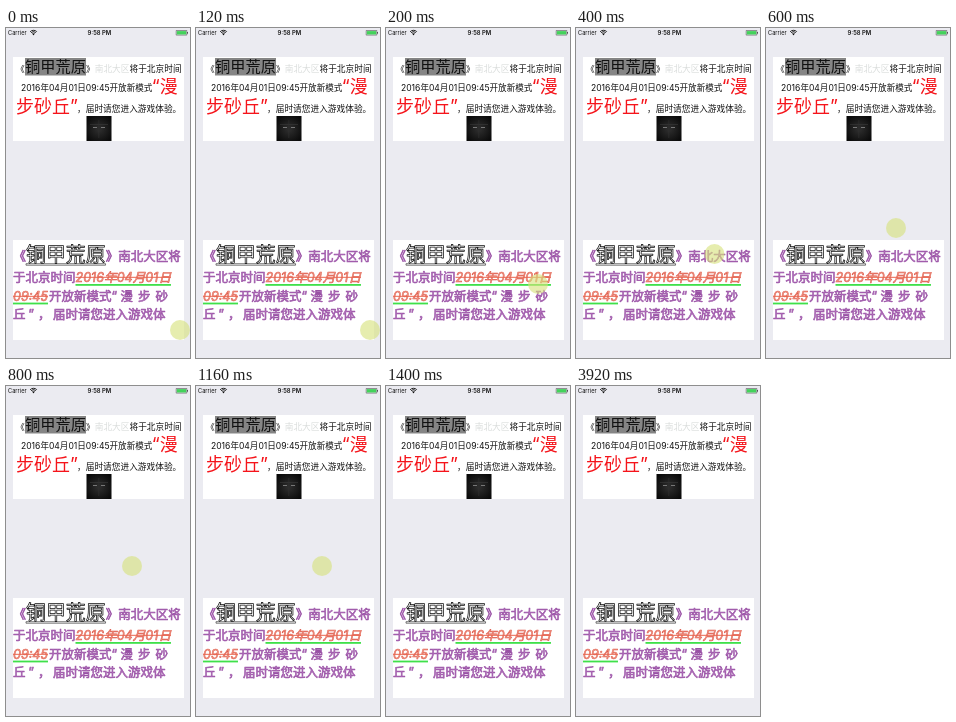
Recreate the animation shown at these times as an HTML page with a canvas. Size 184 by 330 pixels, loop 5600 ms.

```html
<!DOCTYPE html>
<html lang="zh">
<head>
<meta charset="utf-8">
<style>
html, body { margin: 0; width: 100%; height: 100%; overflow: hidden; background: #ebebf1; }
canvas { display: block; width: 184px; height: 330px; }
</style>
</head>
<body>
<canvas id="stage"></canvas>
<script>
const W = 184, H = 330, LOOP = 5600;
const FONT = 'Inter, "Noto Sans CJK SC", "Noto Sans CJK", sans-serif';
const GAME = '铜甲荒原';
const PURPLE = { fill: '#b877c0', stroke: '#9850a4', line: 0.6 };
const DATE = { fill: '#f2a18d', stroke: '#df5a4c', line: 0.55 };
const HOLLOW = { fill: '#fff', stroke: '#111', line: 0.75 };

// Touch dot: start time and centre; null hides it.
const TOUCH = [
  [0, 174, 302],
  [200, 152, 256],
  [400, 138.5, 226],
  [600, 130, 200],
  [800, 126, 180],
  [1400, null]
];

const canvas = document.getElementById('stage');
const ctx = canvas.getContext('2d');
const scale = Math.max(1, window.devicePixelRatio || 1);
canvas.width = W * scale;
canvas.height = H * scale;
ctx.scale(scale, scale);

function rect(x, y, w, h, color) {
  ctx.fillStyle = color;
  ctx.fillRect(x, y, w, h);
}

// Draws one run of text and returns where it ends.
function run(str, x, y, size, style, variant = '') {
  ctx.font = `${variant} ${size}px ${FONT}`;
  ctx.fillStyle = style.fill || style;
  ctx.fillText(str, x, y);
  if (style.stroke) {
    ctx.strokeStyle = style.stroke;
    ctx.lineWidth = style.line;
    ctx.lineJoin = 'round';
    ctx.strokeText(str, x, y);
  }
  return x + ctx.measureText(str).width;
}

function statusBar() {
  run('Carrier', 2, 7, 5.7, '#111');
  run('9:58 PM', 81.5, 7, 5.9, '#111', '600');

  ctx.strokeStyle = '#111';
  ctx.lineWidth = 0.9;
  for (const r of [1.7, 3.3, 4.7]) {
    ctx.beginPath();
    ctx.arc(27.5, 7, r, -Math.PI * 0.76, -Math.PI * 0.24);
    ctx.stroke();
  }
  ctx.fillStyle = '#111';
  ctx.beginPath();
  ctx.arc(27.5, 6.5, 0.7, 0, Math.PI * 2);
  ctx.fill();

  ctx.strokeStyle = '#333';
  ctx.lineWidth = 0.5;
  ctx.strokeRect(170.2, 2.5, 10.6, 4.6);
  rect(170.8, 3.1, 9.4, 3.4, '#43d25b');
  rect(181.2, 4, 0.8, 1.7, '#333');
}

function picture() {
  const glow = ctx.createRadialGradient(93, 101, 2, 93, 101, 16);
  glow.addColorStop(0, '#2b2b2b');
  glow.addColorStop(1, '#080808');
  rect(80.5, 88, 25, 25, glow);
  rect(84, 96, 18, 0.6, '#3a3a3a');
  rect(87, 99, 4, 1, '#777');
  rect(95, 99, 4, 1, '#777');
  rect(92.6, 92, 0.6, 18, '#333');
}

function upperPanel() {
  const size = 8.7, ink = '#111', red = '#f5141b';
  rect(7, 29, 171, 84, '#fff');

  let x = run('《', 10, 44, size, ink);
  rect(19, 30, 61, 17.5, '#858585');
  run(GAME, 19, 44, 15.25, ink);
  x = run('》', 80, 44, size, ink);
  x = run('南北大区', x, 44, size, '#dadddc');
  run('将于北京时间', x, 44, size, ink);

  x = run('2016年04月01日09:45开放新模式', 15, 63, 8.55, ink);
  run('“漫', x - 0.5, 64.5, 18, red);

  x = run('步砂丘”', 10, 84.5, 18, red);
  run('，届时请您进入游戏体验。', 71, 84, size, ink);
  picture();
}

function lowerPanel() {
  const size = 12.5, green = '#3fe04a';
  rect(7, 212, 171, 100, '#fff');

  run('《', 7.5, 233, size, PURPLE);
  const end = run(GAME, 20, 233.5, 19.9, HOLLOW);
  ctx.strokeStyle = '#222';
  ctx.lineWidth = 0.6;
  ctx.strokeRect(20, 235.7, end - 20, 1.5);
  run('》南北大区将', 99.8, 233, size, PURPLE);

  let x = run('于北京时间', 7, 254, size, PURPLE);
  let stop = run('2016年04月01日', x, 253.5, 12.6, DATE, 'italic');
  rect(x, 248.8, stop - x, 1, '#e8654f');
  rect(x, 256, stop - x, 1.8, green);

  stop = run('09:45', 7, 272.5, 12.6, DATE, 'italic');
  rect(7, 267.8, stop - 7, 1, '#e8654f');
  rect(7, 274.6, stop - 7, 1.8, green);
  run('开放新模式“', 43, 272.5, size, PURPLE);
  ['漫', '步', '砂'].forEach((c, i) => run(c, 114.5 + i * 17.5, 272.5, size, PURPLE));

  run('丘', 7, 290.5, size, PURPLE);
  run('”', 22.5, 290.5, size, PURPLE);
  run('，', 32, 290.5, size, PURPLE);
  run('届时请您进入游戏体', 47, 290.5, size, PURPLE);
}

function touch(t) {
  const [, x, y] = TOUCH.filter(p => p[0] <= t).pop();
  if (x === null) return;
  ctx.fillStyle = 'rgba(215, 226, 125, 0.62)';
  ctx.beginPath();
  ctx.arc(x, y, 10, 0, Math.PI * 2);
  ctx.fill();
}

function draw(t) {
  rect(0, 0, W, H, '#ebebf1');
  statusBar();
  upperPanel();
  lowerPanel();
  touch(t);
}

const start = performance.now();
function tick() {
  draw((performance.now() - start) % LOOP);
  requestAnimationFrame(tick);
}
tick();
</script>
</body>
</html>
```
